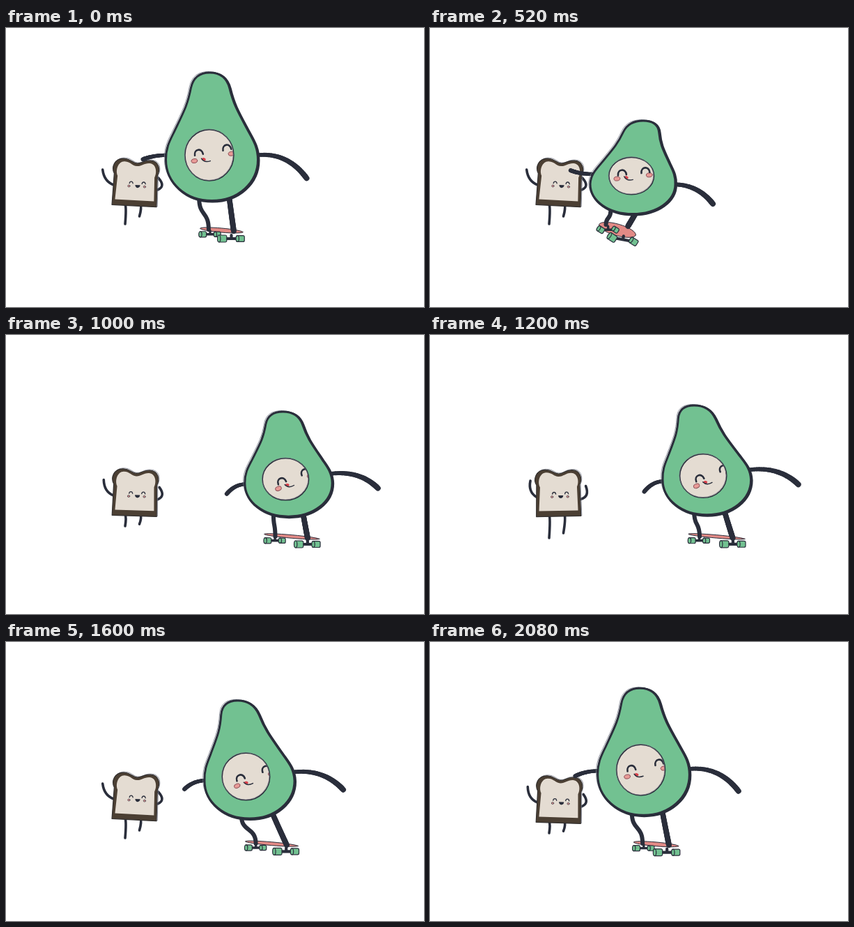
An HTML page with a canvas for the animation above (2.12 s loop, 600 px wide and 400 px high).

```html
<!DOCTYPE html>
<html lang="en">
<head>
<meta charset="utf-8">
<title>Avocado and toast</title>
<style>
html, body { margin: 0; width: 100%; height: 100%; overflow: hidden; background: #fff; }
canvas { display: block; width: 600px; height: 400px; }
</style>
</head>
<body>
<canvas id="stage" width="600" height="400"></canvas>
<script>
const c = document.getElementById('stage').getContext('2d');
const INK = '#2a2e3b', GREEN = '#72c191', CREAM = '#e4dcd2', CRUST = '#4b3f33';
const PINK = '#e28a86', BLUSH = '#e79a96', RED = '#d9414b', SKETCH = '#777a88';
const LOOP = 2120, STEPS = 32;

// Key points of the ride; everything else follows from these by rule.
const KEYS = [0, 3, 8, 15, 21, 24];
const X = [295.5, 252, 291, 405.5, 372, 349.5];
const LEAN = [-3, 5, 15, -8, -23, -17];
const TURN = [0, -.7, -.4, 1, 1, .8];
const REACH = [14, -1, -22, 5, 23, 32];

const mod = (a, n) => (a % n + n) % n;
const mix = (a, b, t) => a + (b - a) * t;
const smooth = t => t * t * (3 - 2 * t);
const rad = d => d * Math.PI / 180;

// Smooth periodic curve through the key points.
function spline(v, k) {
  const n = KEYS.length;
  const span = i => mod(KEYS[mod(i + 1, n)] - KEYS[mod(i, n)], STEPS);
  const slope = i => (v[mod(i + 1, n)] - v[mod(i, n)]) / span(i);
  const tangent = i => mix(slope(i - 1), slope(i), span(i - 1) / (span(i - 1) + span(i)));
  let i = n - 1;
  while (KEYS[i] > k) i--;
  const h = span(i), t = (k - KEYS[i]) / h, u = 1 - t;
  return mix(v[i], v[(i + 1) % n], smooth(t)) + h * t * u * (u * tangent(i) - t * tangent(i + 1));
}

function ride(k) {
  const t = (k - 8) / 24;
  const squat = k < 8 ? smooth((k / 8) ** 1.3) : 1 - t * (1.2 - .2 * t);
  const kick = Math.exp(-(((k - 8) / 3) ** 2));
  const top = 64 + 69 * squat, bot = 247.5 + 19 * squat, h = bot - top;
  return {
    squat, kick, top, bot, h,
    x: spline(X, k), lean: spline(LEAN, k), turn: spline(TURN, k), reach: spline(REACH, k),
    w: 66 - 5 * squat,
    mid: top + .645 * h - 7 * kick
  };
}

function stroke(path, width, color = INK) {
  c.lineWidth = width;
  c.strokeStyle = color;
  c.stroke(path);
}
function fill(path, color) {
  c.fillStyle = color;
  c.fill(path);
}
function oval(x, y, rx, ry, a = 0) {
  const p = new Path2D();
  p.ellipse(x, y, rx, ry, a, 0, Math.PI * 2);
  return p;
}
function inFrame(x, y, a, draw) {
  c.save();
  c.translate(x, y);
  c.rotate(a);
  draw();
  c.restore();
}
function curve(x0, y0, x1, y1, x2, y2, w) {
  stroke(new Path2D(`M${x0},${y0} Q${x1},${y1} ${x2},${y2}`), w);
}
// Curved limb that thickens towards its end.
function limb(x0, y0, x1, y1, x2, y2, w0, w1) {
  let px = x0, py = y0;
  for (let t = 0; t <= 1; t += 1 / 24) {
    const x = mix(mix(x0, x1, t), mix(x1, x2, t), t);
    const y = mix(mix(y0, y1, t), mix(y1, y2, t), t);
    stroke(new Path2D(`M${px},${py} L${x},${y}`), mix(w0, w1, t));
    px = x;
    py = y;
  }
}

const SLICE = new Path2D('M-32,33 L-31,-12 C-36,-20 -32,-34 -18,-34 C-8,-34 -6,-28 1,-28 '
  + 'C8,-28 10,-33 20,-33 C33,-33 35,-20 31,-12 L32,33 Z');
const CRUMB = new Path2D('M-28,25 L-26,-9 C-30,-17 -26,-30 -17,-30 C-8,-30 -6,-24 1,-24 '
  + 'C8,-24 11,-29 19,-29 C28,-29 31,-17 27,-9 L28,25 Z');
const BLINK = new Path2D('M-6,3.5 C-6,-6 6,-6 6,3.5');
const SMALL_BLINK = new Path2D('M-2.5,1 C-2,-2.5 2,-2.5 2.5,1');
const GRIN = new Path2D('M-3.6,-1.5 L3.6,-1.5 C3.6,3.8 -3.6,3.8 -3.6,-1.5 Z');

// One dance beat lasts eight steps.
function drawToast(k) {
  const beat = k / 8 * Math.PI * 2, cos = Math.cos(beat), sin = Math.sin(beat);
  const tilt = 4 * cos - 1, s = (1 + cos) / 2;
  const x = 184.5 + tilt * .4, y = 227 - 5 * cos ** 6;
  curve(171, y + 30, 173, y + 36, 171, 281 + 10 * sin, 3.6);
  curve(193, y + 30, 195, y + 36, 191.5, 281 - 11 * cos + 3 * sin, 3.6);
  curve(x - 31, y + mix(8, 3, s), x - mix(42, 45, s), y - 2,
    x - mix(33, 47, s), y - mix(17, 19, s), 3.6);
  curve(x + 32, y + mix(7, 10, s), x + mix(47, 44, s), y + 5,
    x + mix(46, 33, s), y - mix(14, 7, s), 3.6);
  inFrame(x, y, rad(tilt), () => {
    inFrame(1.2, -1, 0, () => stroke(SLICE, .8, SKETCH));
    fill(SLICE, CRUST);
    stroke(SLICE, 1.2, '#33302f');
    fill(CRUMB, CREAM);
    for (const cx of [-9, 13.5]) {
      fill(oval(cx, 5, 1.7, 1.4), BLUSH);
      stroke(oval(cx, 5, 1.7, 1.4), .7);
    }
    for (const ex of [-6, 12]) inFrame(ex, 0, 0, () => stroke(SMALL_BLINK, 1.3));
    inFrame(3.5, 4.5, 0, () => fill(GRIN, INK));
  });
}

function wheel(x, y, w, h, a) {
  inFrame(x, y, a, () => {
    const tread = new Path2D();
    tread.roundRect(-w / 2, -h / 2, w, h, 2);
    const face = oval(1.5 - w / 2, 0, 2.2, h / 2);
    for (const part of [tread, face]) {
      fill(part, GREEN);
      stroke(part, 1.2);
    }
  });
}
function truck(x0, x1, y, size, a) {
  const mx = (x0 + x1) / 2;
  stroke(new Path2D(`M${x0},${y} L${x1},${y} M${mx},${y} L${mx},${y - 5}`), size * .4);
  wheel(x1, y, size * 1.1, size * .85, a);
  wheel(x0, y, size * 1.2, size * .95, a);
}

function drawBoard(r, rx) {
  const { turn, kick } = r, a = rad(32 * kick);
  inFrame(r.x + r.reach, 290 - turn - kick, 0, () => {
    const deck = oval(0, 0, rx, 3 - .7 * turn + 5 * kick, rad(5 + 11 * kick));
    fill(deck, PINK);
    stroke(deck, 1);
    truck(-.87 * rx, -6 - 8 * turn, 5.8 - 6 * kick, 8.5, a);
    inFrame(0, 12, a / 3, () => truck(1 + 9 * turn - 5 * kick, .87 * rx, -turn, 10.5, a * .7));
  });
}

// Right half of the fruit as Bezier points: half widths and heights from 0 to 1.
const HALF = [[0, 0], [.2, 0], [.36, .03], [.42, .12], [.5, .25], [.58, .3], [.8, .455],
  [.9, .525], [1, .58], [1, .68], [1, .86], [.57, 1], [0, 1]];
const OUTLINE = [...HALF, ...HALF.slice(0, -1).reverse().map(([u, v]) => [-u, v])];

function bodyPath(r) {
  const pts = OUTLINE.map(([u, v]) =>
    [r.x + u * r.w + r.lean * Math.max(0, 1 - v / .6), r.top + v * r.h]);
  const p = new Path2D();
  p.moveTo(...pts[0]);
  for (let i = 1; i < pts.length; i += 3) {
    p.bezierCurveTo(...pts[i], ...pts[i + 1], ...pts[i + 2]);
  }
  p.closePath();
  return p;
}

function drawFace(r) {
  const { turn } = r, sy = r.h / 183;
  const px = r.x - 3.3 + r.lean * .1, rx = r.w * .53, ry = r.h * .2;
  const pit = oval(px, r.mid, rx, ry);
  fill(pit, CREAM);
  c.save();
  c.clip(pit);
  inFrame(px + (8 * turn - 15.5) * sy, r.mid + (6.5 * turn - 4) * sy, -rad(10 + 11 * turn), () => {
    const gap = 14 + 27 * sy;
    for (const [cx, cy] of [[-8, 11 * sy], [gap + 5, 10 * sy]]) {
      const cheek = oval(cx, cy, 4.4, 3);
      fill(cheek, BLUSH);
      stroke(cheek, .9, '#8a4a54');
    }
    for (const ex of [0, gap]) inFrame(ex, 0, 0, () => stroke(BLINK, 2.6));
    inFrame(8, 12.5 * sy, rad(12), () => {
      fill(oval(-2.5, -1, 2.8, 2, .3), RED);
      stroke(new Path2D('M-6,-2 C-3,2.5 2,3 7,1'), 1.4);
    });
  });
  c.restore();
  stroke(pit, 1.5);
  stroke(oval(px - .8, r.mid - .8, rx, ry), .6, SKETCH);
}

function drawLegs(r, rx) {
  const hip = r.bot - 4, foot = 289 - 7 * r.kick, bend = (foot - hip) * .6;
  const toe = r.x + r.reach;
  const lh = r.x - 23.5 + .37 * r.reach, lf = toe - .6 * rx;
  const rh = r.x + 18 + .47 * r.reach, rf = toe + .56 * rx;
  stroke(new Path2D(`M${lh},${hip} C${lh},${hip + bend} ${lf},${foot - bend} ${lf},${foot}`), 6);
  limb(rh, hip - 3, (rh + rf) / 2, (hip + foot) / 2, rf, foot + 2, 7.5, 8);
}

// The shoulders roll with the turn.
function drawArms(r) {
  const { squat, kick, turn } = r;
  const lx = r.x - r.w, ly = r.mid + 7 * turn, ldx = 6 * squat + 3 * turn - 33;
  limb(lx + 2, ly, lx + ldx * .55, ly, lx + ldx, ly + 6 + 8 * turn - 8 * kick, 5, 6);
  const rx = r.x + r.w, ry = r.mid - 8 * turn + 9 * kick, rdx = 70 + 5 * turn - 14 * squat;
  limb(rx - 2, ry, rx + rdx * .6, ry - 5 * (1 - kick),
    rx + rdx, ry + 33 - 8 * squat - 7 * turn, 5.5, 8);
}

function drawAvocado(k) {
  const r = ride(k), deck = 31 + 9 * r.turn;
  drawBoard(r, deck);
  drawLegs(r, deck);
  drawArms(r);
  const shape = bodyPath(r);
  inFrame(-2.2, -1.4, 0, () => stroke(shape, .8, SKETCH));
  inFrame(1, 1, 0, () => stroke(shape, 4));
  fill(shape, GREEN);
  stroke(shape, 3);
  drawFace(r);
}

function render(now) {
  const t = now % LOOP;
  let k = STEPS - 1;
  while (Math.round(k * 5 / 3) * 40 > t) k--;
  c.fillStyle = '#fff';
  c.fillRect(0, 0, 600, 400);
  c.lineCap = c.lineJoin = 'round';
  drawToast(k);
  drawAvocado(k);
}

const start = performance.now();
function tick() {
  render(performance.now() - start);
  requestAnimationFrame(tick);
}
tick();
</script>
</body>
</html>
```
